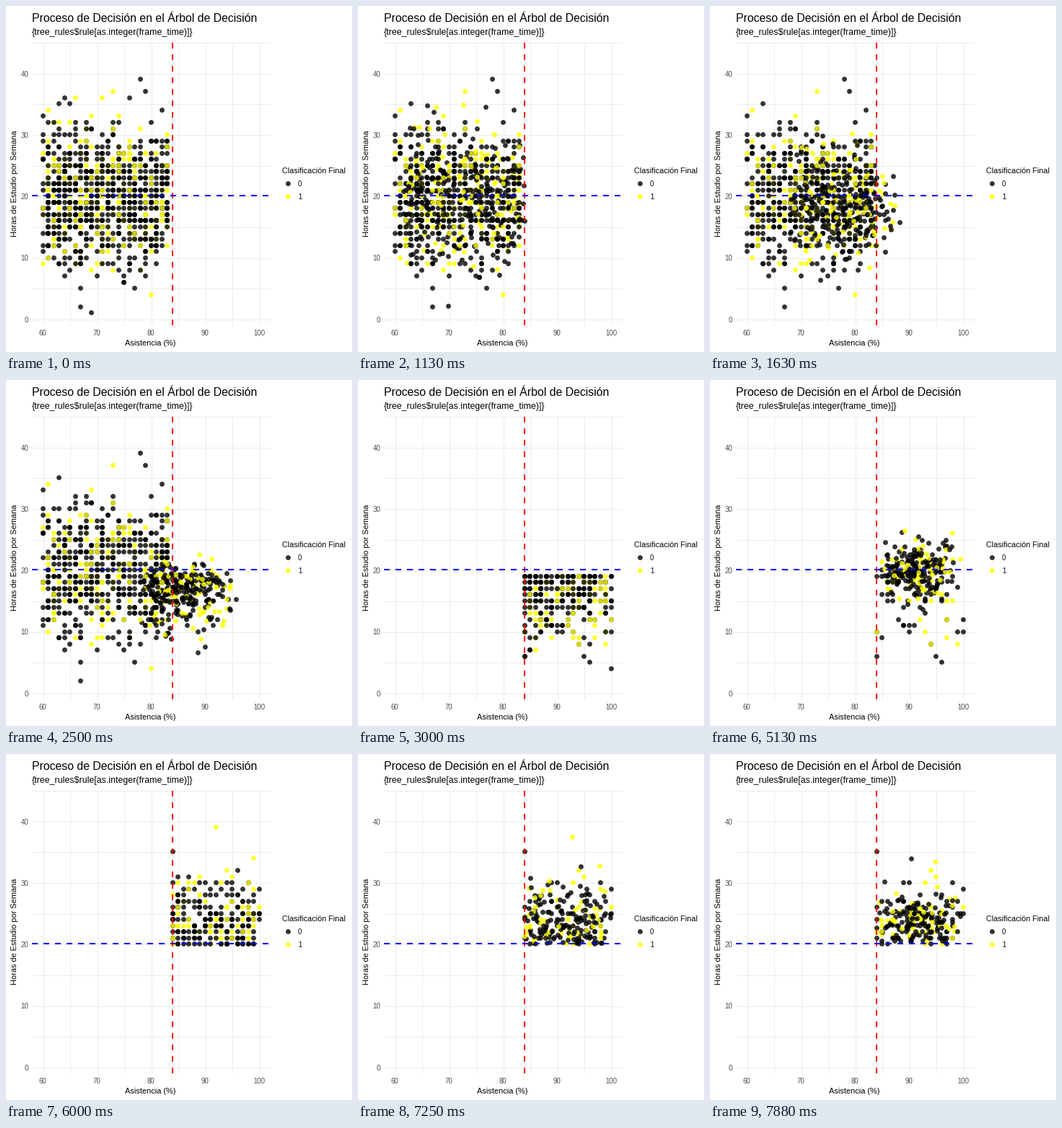
Write a matplotlib script that moves like this. It is 480 by 480 pixels and loops after 8000 ms.

```python
import numpy as np
import matplotlib.pyplot as plt
from matplotlib.animation import FuncAnimation

PX = 0.72                      # points per pixel at 100 dpi
SIZE, FRAMES, STEP = 480, 64, 125
LEFT, RIGHT, TOP, BOTTOM = 36, 366, 50, 443
BLACK, YELLOW = (0, 0, 0, 0.8), (1, 1, 0, 0.8)
GRID, TICK = "#EBEBEB", "#4D4D4D"
SPANS = [(8, 24), (33, 48), (56, 71)]   # frames in which the points travel

plt.rcParams["font.family"] = "Liberation Sans"
rng = np.random.default_rng(11)


def px(x):
    return 51.3 + 7.5 * (np.asarray(x) - 60)


def py(y):
    return 434.43 - 8.53 * np.asarray(y)


def mid(v):
    """Centre of the pixel that holds v."""
    return np.floor(v) + 0.5


def students(n, xlim, ylim, first=(), last=()):
    """Even attendance, bell-shaped hours; first and last are the extremes.

    Early rows travel on to the next state, late rows wait."""
    xs, ys = (np.arange(lo, hi + 1) for lo, hi in (xlim, ylim))
    wx = np.where((xs == 60) | (xs == 100), 0.5, 1.0)
    wy = np.exp(-((ys - 20) / 6) ** 2 / 2)
    bulk = np.column_stack([rng.choice(xs, n, p=wx / wx.sum()),
                            rng.choice(ys, n, p=wy / wy.sum())])
    ends = [np.array(p, float).reshape(-1, 2) for p in (first, last)]
    return np.vstack([ends[0], bulk, ends[1]])


# each state: students of class 0, students of class 1
LOW, HIGH = (60, 83), (84, 100)
low_att = [
    students(710, LOW, (5, 32), [(76, 36), (64, 36), (65, 35), (69, 1)],
             [(78, 39), (79, 37), (63, 35), (82, 34), (60, 33), (67, 2)]),
    students(235, LOW, (7, 33), [(71, 36), (66, 36)],
             [(73, 37), (61, 34), (80, 4)]),
]
few_hours = [
    students(222, HIGH, (6, 19), [(100, 4)], [(96, 5), (84, 6)]),
    students(80, HIGH, (7, 19)),
]
many_hours = [
    students(172, HIGH, (20, 31), [(96, 32)], [(84, 35), (98, 30), (100, 29)]),
    students(62, HIGH, (20, 31), [(92, 39), (99, 34)], [(94, 32)]),
]
last_rule = [
    students(132, HIGH, (20, 30), [(84, 36)]),
    students(50, HIGH, (20, 30), [(98, 27), (91, 24)]),
]


def link(a, b, mix=True):
    """Start, end and colour of every point between two states."""
    start, end, tint = [], [], []
    for src, dst, color in zip(a, b, (BLACK, YELLOW)):
        goal = src.copy()
        goal[:len(dst)] = rng.permutation(dst) if mix else dst
        start.append(src)
        end.append(goal)
        tint += [color] * len(src)
    order = rng.permutation(len(tint))
    return (np.vstack(start)[order], np.vstack(end)[order],
            np.array(tint)[order])


moves = [link(low_att, few_hours),
         link(few_hours, many_hours),
         link(many_hours, last_rule, mix=False)]

fig = plt.figure(figsize=(SIZE / 100, SIZE / 100), dpi=100, facecolor="white")
ax = fig.add_axes([0, 0, 1, 1])
ax.set_xlim(0, SIZE)
ax.set_ylim(SIZE, 0)
ax.axis("off")


def line(xs, ys, color, width, z, style="-"):
    ax.plot(xs, ys, color=color, lw=width * PX, ls=style, zorder=z,
            solid_capstyle="butt", dash_capstyle="butt")


def label(x, y, s, size, color="black", **kw):
    ax.text(x, y, s, fontsize=size * PX, color=color, va="baseline", **kw)


def dots(x, y, color):
    return ax.scatter(x, y, s=(6.9 * PX) ** 2, c=color, linewidths=0, zorder=3)


for v in range(60, 101, 5):
    line([mid(px(v))] * 2, [TOP, BOTTOM], GRID, 1, 1)
for v in range(0, 46, 5):
    line([LEFT, RIGHT], [mid(py(v))] * 2, GRID, 1, 1)
for v in range(60, 101, 10):
    label(px(v), 457, str(v), 9.6, TICK, ha="center")
for v in range(0, 41, 10):
    label(31.5, py(v) + 4.3, str(v), 9.6, TICK, ha="right")

DASH = (0, (4, 4))
line([231, 231], [BOTTOM, TOP], "#FF0000", 2, 4, DASH)
line([LEFT, RIGHT], [263, 263], "#0000FF", 2, 5, DASH)

label(35.5, 22, "Proceso de Decisión en el Árbol de Decisión", 15.85)
label(35.5, 40, r"{tree_rules\$rule[as.integer(frame_time)]}", 12.45)
label(200.5, 471, "Asistencia (%)", 11, ha="center")
label(15.5, 246, "Horas de Estudio por Semana", 11, ha="center",
      rotation=90, rotation_mode="anchor")

label(383, 232, "Clasificación Final", 10.8)
for y, color, name in ((245.5, BLACK, "0"), (263.5, YELLOW, "1")):
    dots([390.5], [y], [color])
    label(405, y + 5, name, 9.6)

cloud = dots([], [], None)


def update(frame):
    k = sum(frame >= end for _, end in SPANS)
    begin, end = SPANS[k]
    p = max(0, frame - begin) / (end - begin)
    a, b, tint = moves[k]
    pos = a + (b - a) * p
    cloud.set_offsets(np.column_stack([mid(px(pos[:, 0])),
                                       mid(py(pos[:, 1]))]))
    cloud.set_facecolors(tint)
    return [cloud]


anim = FuncAnimation(fig, update, frames=FRAMES, interval=STEP,
                     repeat=True, repeat_delay=0)
plt.show()
```
